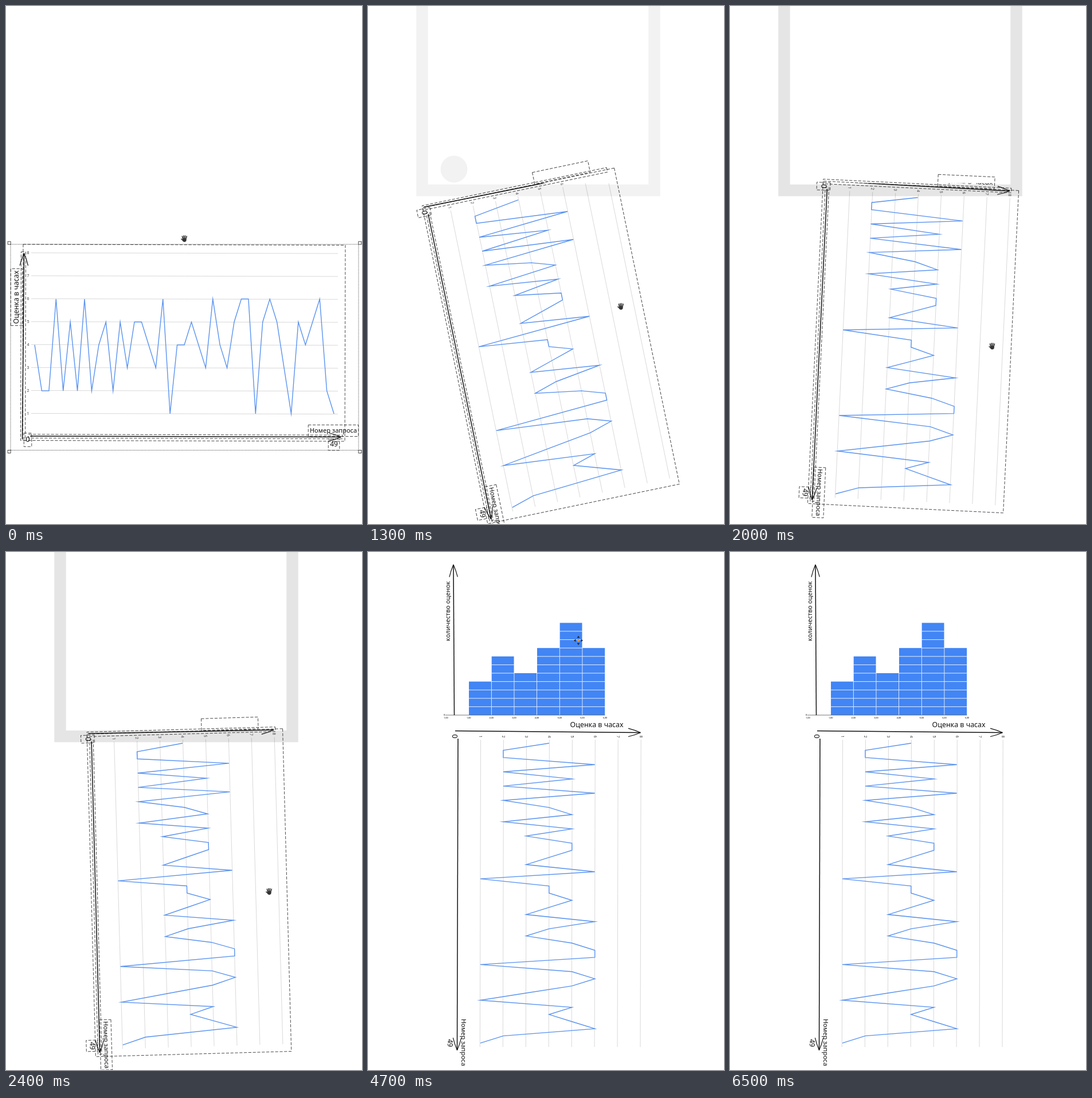
An HTML page with a canvas that plays this animation: 621 by 902 pixels, repeating every 8.6 s.

```html
<!DOCTYPE html>
<html lang="ru">
<head>
<meta charset="utf-8">
<style>
html, body { margin: 0; width: 100%; height: 100%; overflow: hidden; background: #fff; }
canvas { display: block; }
</style>
</head>
<body>
<canvas id="stage" width="621" height="902"></canvas>
<script>
const g = document.getElementById('stage').getContext('2d');
const LOOP = 8600, STEP = 100;
const CX = 311.5, CY = 594.5, BASE = 750, HOUR = 39.95;
const THIN = 0.7;
const HAND = '"Noto Sans", "Open Sans", sans-serif';
const SMALL = 'Roboto, "Open Sans", sans-serif';

const hours = [...'4226252624525355436144543643566156531545621'].map(Number);
const axes = [[28.5, 754, 31.5, 430.5], [42, 749, 584.5, 750.5]];
const labels = [
  { str: 'Оценка в часах', x: 18.5, y: 507, w: 99, h: 20.5, size: 12.3, angle: -90 },
  { str: 'Номер запроса', x: 571, y: 739.5, w: 87.5, h: 20, size: 11 },
  { str: '0', x: 38, y: 755.5, w: 13.5, h: 23.5, size: 13 },
  { str: '49', x: 572, y: 764, w: 19.5, h: 19.5, size: 12 },
];

// moves: from ms, to ms, then the new values
const turns = [[493, 1600, 95.4], [1700, 2400, 88.3], [2600, 2800, 90]];
const glides = [
  [500, 900, 426, 453], [900, 1700, 456, 593], [1700, 2400, 459, 591], [3200, 3300, 454, 582],
  [3300, 3600, 294, 115], [4200, 4300, 322, 147], [4400, 4700, 367, 154], [4800, 5000, 435, 147],
  [5100, 5400, 508, 197], [5500, 5800, 486, 158], [6300, 6400, 475, 136],
];

function follow(values, moves, t) {
  for (const [from, to, ...next] of moves) {
    const k = Math.min(1, Math.max(0, (t - from) / (to - from)));
    const eased = k * k * (3 - 2 * k);
    values = values.map((v, i) => v + (next[i] - v) * eased);
  }
  return values;
}

function placed(x, y, degrees, draw) {
  g.save();
  g.translate(x, y);
  g.rotate(degrees * Math.PI / 180);
  draw();
  g.restore();
}

function path(points, color, width) {
  g.beginPath();
  points.forEach(p => g.lineTo(...p));
  g.strokeStyle = color;
  g.lineWidth = width;
  g.stroke();
}

function disc(x, y, r, color) {
  g.beginPath();
  g.arc(x, y, r, 0, 7);
  g.fillStyle = color;
  g.fill();
}

function text(str, x, y, font, angle = 0, color = '#111') {
  placed(x, y, angle, () => {
    g.font = font;
    g.fillStyle = color;
    g.textAlign = 'center';
    g.textBaseline = 'middle';
    g.fillText(str, 0, 0);
  });
}

function arrow(x0, y0, x1, y1) {
  path([[x0, y0], [x1, y1]], '#111', 1.5);
  placed(x1, y1, Math.atan2(y1 - y0, x1 - x0) * 180 / Math.PI, () => {
    g.beginPath();
    for (const side of [-1, 1]) {
      g.moveTo(-21.5, side * 7.2);
      g.quadraticCurveTo(-10, side * 4.4, 0, 0);
    }
    g.lineWidth = 1.2;
    g.stroke();
  });
}

function chart() {
  for (let v = 1; v <= 8; v++) {
    const y = BASE - v * HOUR;
    path([[44, y - 0.6], [579, y + 0.6]], '#d9d9d9', 1);
    text(v, 38.5, y, `7px ${SMALL}`, 0, '#444');
  }
  path(hours.map((v, i) => [50 + i * 12.43, BASE - v * HOUR]), '#5a93f0', 1.4);
  axes.forEach(a => arrow(...a));
  for (const l of labels) text(l.str, l.x, l.y, `500 ${l.size}px ${HAND}`, l.angle);
}

function outline(x, y, w, h, angle = 0) {
  placed(x, y, angle, () => g.strokeRect(-w / 2, -h / 2, w, h));
}

function outlines() {
  g.strokeStyle = '#000';
  g.lineWidth = THIN;
  g.setLineDash([5.2, 2.6]);
  outline(310.5, 586.5, 562, 341.5, 0.15);
  for (const [x0, y0, x1, y1] of axes) {
    outline((x0 + x1) / 2, (y0 + y1) / 2, Math.abs(x1 - x0) + 5, Math.abs(y1 - y0) + 5, 0.15);
  }
  for (const l of labels) outline(l.x, l.y, l.w, l.h, l.angle);
}

function histogram() {
  const left = 136, base = 284, w = 39.65, unit = 14.6;
  for (let v = 1; v <= 6; v++) {
    const x = left + v * w, n = hours.filter(h => h === v).length;
    g.fillStyle = '#4285f4';
    g.fillRect(x + 0.4, base - n * unit, w - 0.8, n * unit);
    for (let k = 1; k < n; k++) path([[x, base - k * unit], [x + w, base - k * unit]], '#e4edfd', 1);
  }
  path([[134.5, base], [413.5, base]], '#555', 0.8);
  for (let i = 0; i < 8; i++) {
    const value = Math.min(6, Math.max(1, i));
    text(`${value},00`, left + i * w, 289, `4px ${SMALL}`);
  }
  text('0', 133, base, `4px ${SMALL}`);
  arrow(150.5, base, 149, 22);
  text('количество оценок', 140, 103, `500 11px ${HAND}`, -90);
}

function selection(x, y, w, h) {
  g.strokeStyle = '#000';
  g.lineWidth = THIN;
  g.setLineDash([1.3, 1.3]);
  g.strokeRect(x, y, w, h);
  g.setLineDash([]);
  g.fillStyle = '#fff';
  for (const hx of [x - 2.4, x + w + 2.4]) for (const hy of [y - 2.4, y + h + 2.4]) {
    g.fillRect(hx - 2.5, hy - 2.5, 5, 5);
    g.strokeRect(hx - 2.5, hy - 2.5, 5, 5);
  }
}

function highlight(first) {
  const shade = `rgba(0,0,0,${first ? 0.05 : 0.1})`;
  g.strokeStyle = shade;
  g.lineWidth = 20.5;
  g.strokeRect(94.5, -100, 405, 421);
  if (first) disc(150, 284, 23.5, shade);
}

function handCursor() {
  g.lineCap = 'round';
  for (let i = 0; i < 4; i++) {
    const x = i * 2.6 - 3.6;
    path([[x * 0.6, 2], [x, Math.abs(i - 1.5) - 5.5]], '#333', 1.6);
  }
  path([[-1.5, 4], [-5, 0.8]], '#333', 1.6);
  disc(0.3, 2.6, 3.3, '#333');
}

function moveCursor() {
  for (let i = 0; i < 4; i++) {
    placed(0, 0, i * 90, () => {
      g.fillStyle = '#222';
      g.beginPath();
      g.moveTo(0, -8);
      g.lineTo(2.5, -4.6);
      g.lineTo(-2.5, -4.6);
      g.fill();
    });
  }
  disc(0, 0, 2.2, '#e8964a');
}

function arrowCursor() {
  g.fillStyle = '#111';
  g.beginPath();
  g.lineTo(0, 0);
  g.lineTo(0, 15);
  g.lineTo(3.5, 12);
  g.lineTo(10.5, 11);
  g.fill();
  path([[3.5, 9], [7, 17]], '#111', 2);
}

function draw(t) {
  const angle = follow([0], turns, t)[0];
  const covered = t < 4500;
  const turned = draw => placed(CX, CY, angle, () => {
    g.translate(-CX, -CY);
    draw();
  });

  g.fillStyle = '#fff';
  g.fillRect(0, 0, 621, 902);
  if (!covered) histogram();
  turned(chart);
  if (covered) {
    g.fillStyle = '#fff';
    g.fillRect(104.5, 0, 384.5, 308.5);
  }
  if (t >= 700 && t < 3300) highlight(t < 1500);
  if (t < 4100) turned(outlines);

  if (t < 600) selection(8, 415, 607, 358.5);
  else if (t >= 3300 && t < 4100) {
    selection(131.5, 290.5, 360, 607.5);
    g.beginPath();
    g.arc(311.5, 278.5, 2.6, 0, 7);
    g.stroke();
  } else if (t >= 4100 && covered) selection(105, -40, 384, 351);

  if (t < 6500) {
    const [x, y] = follow([311, 405], glides, t);
    placed(x, y, 0, t < 3300 ? handCursor : t < 5200 ? moveCursor : arrowCursor);
  }
}

function loop() {
  const t = performance.now() % LOOP;
  draw(Math.floor(t / STEP) * STEP);
  requestAnimationFrame(loop);
}
loop();
</script>
</body>
</html>
```
